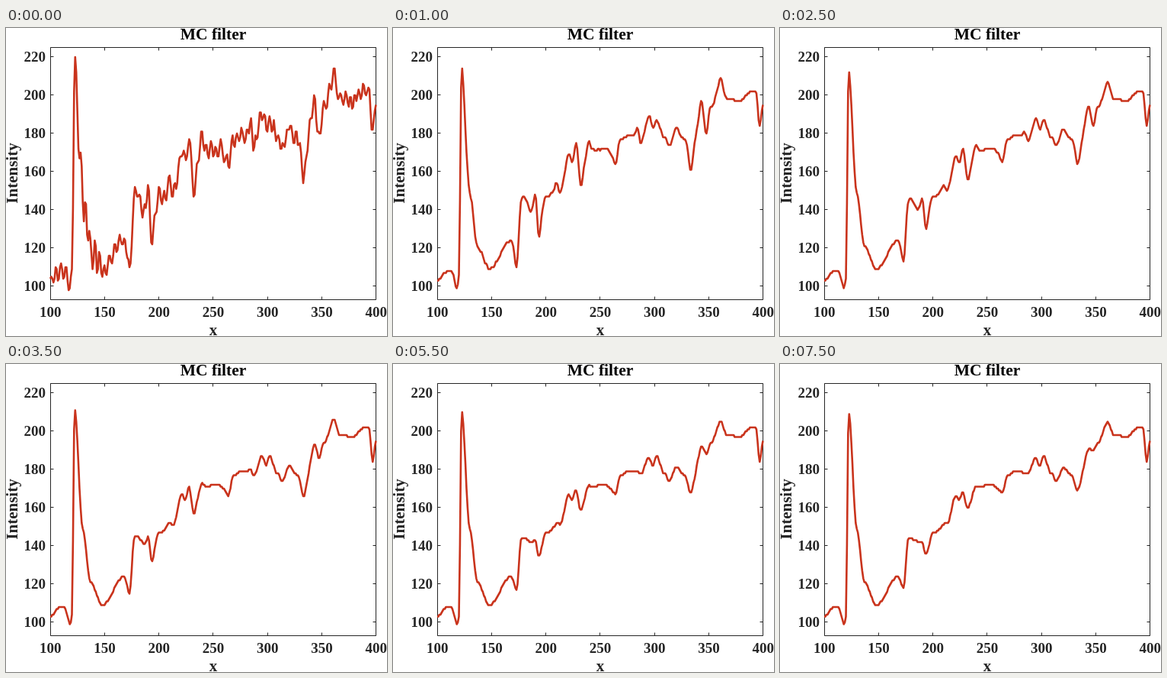
An HTML page for the animation above (8000 ms loop, 500x403 px).

```html
<!DOCTYPE html>
<html lang="en">
<head>
<meta charset="utf-8">
<title>MC filter</title>
<style>
  html, body { margin: 0; width: 100%; height: 100%; overflow: hidden; background: #fff; }
  svg { display: block; width: 500px; height: 403px; }
  text { font: bold 19px "Liberation Serif", "Times New Roman", serif; fill: #262626; text-anchor: middle; }
  .label { font-size: 21px; }
  .title { font-size: 21.5px; fill: #000; }
  .yTick { text-anchor: end; }
  #axes { fill: none; stroke: #262626; stroke-width: 1; }
  #curve { fill: none; stroke: #c9331c; stroke-width: 2.6; stroke-linejoin: round; }
</style>
</head>
<body>
<svg viewBox="0 0 500 403">
  <path id="axes"/>
  <g id="ticks"></g>
  <text class="title" x="272" y="15">MC filter</text>
  <text class="label" x="272" y="402">x</text>
  <text class="label" transform="translate(14.5 190) rotate(-90)">Intensity</text>
  <path id="curve"/>
</svg>
<script>
const STEP_MS = 500, STEPS = 16;
const BOX = { left: 58.5, top: 25.5, right: 485.5, bottom: 355.5 };
const px = x => 58 + (x - 100) * 1.425;
const py = v => 38 + (220 - v) * 2.5;

// Turning points [x, intensity] of the smoothed signal, joined by easing.
const turns = [
  [100, 103], [109, 108], [113, 108], [118.5, 99], [120, 103], [122.5, 210], [130, 149],
  [137, 121], [148, 109], [168, 124], [173, 118], [177.5, 144], [190, 142], [193.5, 136],
  [200.5, 147], [213.5, 152], [221, 166], [224.2, 164], [227.5, 168], [232, 160],
  [240, 171], [255, 172], [264, 168], [269, 177], [276, 179], [288, 178], [294.5, 186],
  [298.6, 182], [302, 187], [309, 178], [314, 174], [320, 181], [328, 177], [333, 169],
  [344, 191], [348, 190], [352, 194], [361, 204.5], [367, 198], [379, 197], [389, 202],
  [393.5, 202], [397, 184], [400, 195]
];

// Peaks and dips [x, height] that flatten slowly.
const bumps = [
  [122, 5], [173, -7], [180, 3], [186.4, -3], [190.5, 6], [193.7, -9], [210, 3], [213, -3],
  [221.4, 3], [228.2, 6], [232.5, -6.5], [239.5, 4], [264, -3.5], [284.5, 4], [287.5, -3],
  [295.7, 3.5], [320, 2], [333.7, -7], [343, 5.5], [347.7, -9], [361, 4]
];

function seededRandom(seed) {
  return () => (seed = seed * 16807 % 2147483647) / 2147483647;
}

// Fine alternating ripples, strongest just after the pulse, gone after a few passes.
function makeRipples() {
  const random = seededRandom(20), ripples = [];
  let sign = 1;
  for (let x = 101; x < 396; x += 1.6 + 1.4 * random()) {
    const strength = 4 + 7 * bell(x, 133, 8);
    ripples.push([x, sign * strength * (0.5 + random())]);
    sign = -sign;
  }
  return ripples;
}

const bell = (x, center, width) => Math.exp(-(((x - center) / width) ** 2) / 2);
const total = (items, x, width) =>
  items.reduce((sum, [center, height]) => sum + height * bell(x, center, width), 0);

function settled(x) {
  const i = Math.max(1, turns.findIndex(p => p[0] >= x));
  const [x0, v0] = turns[i - 1], [x1, v1] = turns[i];
  const u = (x - x0) / (x1 - x0);
  return v0 + (v1 - v0) * u * u * (3 - 2 * u);
}

const ripples = makeRipples();
const samples = Array.from({ length: 301 }, (_, i) => {
  const x = 100 + i;
  return { x, base: settled(x), slow: total(bumps, x, 1.5), fast: total(ripples, x, 0.8) };
});

const decay = n => Math.exp(-n / 8) - Math.exp(-(STEPS - 1) / 8);

function curvePath(step) {
  const slowGain = decay(step) / decay(3);
  const fastGain = 0.3 ** step;
  return "M" + samples.map(({ x, base, slow, fast }) => {
    const value = Math.min(225, Math.round(base + slow * slowGain + fast * fastGain));
    return px(x).toFixed(2) + " " + py(value);
  }).join("L");
}

function drawAxes() {
  const { left, top, right, bottom } = BOX, len = 4;
  let d = `M${left} ${top}H${right}V${bottom}H${left}Z`, labels = "";
  for (let x = 100; x <= 400; x += 50) {
    const p = Math.floor(px(x)) + 0.5;
    d += `M${p} ${bottom}v${-len}M${p} ${top}v${len}`;
    labels += `<text x="${px(x) + 0.3}" y="378">${x}</text>`;
  }
  for (let v = 100; v <= 220; v += 20) {
    const p = py(v) - 0.5;
    d += `M${left} ${p}h${len}M${right} ${p}h${-len}`;
    labels += `<text class="yTick" x="52" y="${py(v) + 5.5}">${v}</text>`;
  }
  document.getElementById("axes").setAttribute("d", d);
  document.getElementById("ticks").innerHTML = labels;
}

const curve = document.getElementById("curve");
const start = performance.now();
let shown = -1;

function render() {
  const step = Math.floor((performance.now() - start) / STEP_MS) % STEPS;
  if (step !== shown) curve.setAttribute("d", curvePath(shown = step));
  requestAnimationFrame(render);
}

drawAxes();
render();
</script>
</body>
</html>
```
